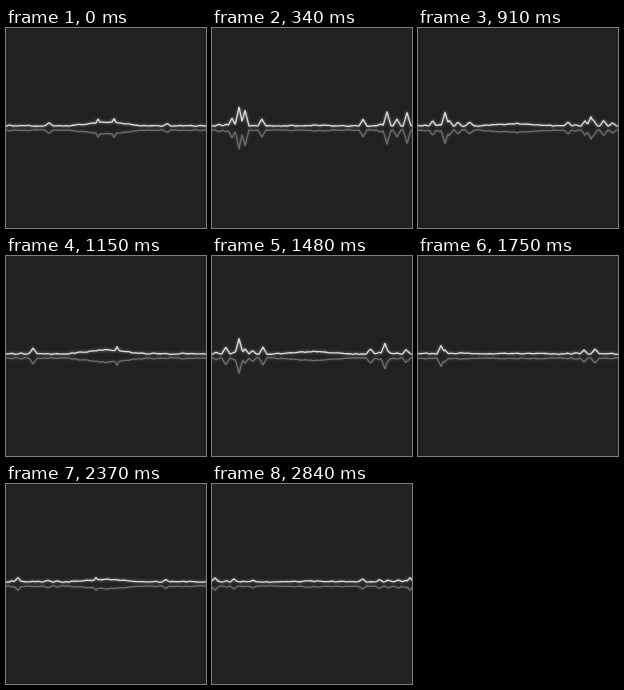
An HTML page with a canvas for the animation above (2890 ms loop, 200 by 200 pixels).

```html
<!DOCTYPE html>
<html lang="en">
<head>
<meta charset="utf-8">
<title>Sound wave</title>
<style>
  html, body { margin: 0; width: 100%; height: 100%; overflow: hidden; background: #212121; }
  canvas { display: block; width: 200px; height: 200px; }
</style>
</head>
<body>
<canvas id="wave" width="200" height="200"></canvas>
<script>
const LOOP = 2890, STEP = 50, MID = 100;
const ctx = document.getElementById('wave').getContext('2d');

// Key moments: hump is the bass in the middle, edge the treble at both sides,
// peaks the few [x, height] that stand out.
const keys = [
  { t: 0, hump: 4, edge: 1, peaks: [[43, 3], [92, 7], [108, 7], [161, 2]] },
  { t: 340, hump: .6, edge: 3, peaks: [[20, 8], [27, 19], [33, 16], [50, 7], [151, 7], [175, 14], [185, 7], [195, 13]] },
  { t: 680, hump: 1, edge: 2, peaks: [[17, 4.5], [32, 3], [73, 4], [80, 4], [87, 4], [122, 2.5], [170, 4]] },
  { t: 1150, hump: 4.4, edge: .8, peaks: [[27, 6], [111, 7]] },
  { t: 1750, hump: .4, edge: 1.2, peaks: [[23, 8], [27, 4], [166, 4], [177, 5]] },
  { t: 2370, hump: 2.6, edge: 1, peaks: [[12, 4], [42, 2], [90, 4], [160, 2.5]] },
  { t: 2840, hump: .8, edge: 3.2, peaks: [[3, 4], [22, 3], [198, 4]] }
];

// Loud hits between them: time and height.
const hits = [[830, 27], [1470, 23], [2030, 35], [2600, 18]];

const mix = (a, b, u) => a + (b - a) * u;
const ease = u => u * u * (3 - 2 * u);
const bump = (d, w) => Math.max(0, 1 - Math.abs(d) / w);
const rand = (a, b) => {
  const v = Math.sin(a * 127.1 + b * 311.7) * 43758.5453;
  return v - Math.floor(v);
};

function ripple(seed, x) {
  const u = x / 3, i = Math.floor(u);
  return mix(rand(seed, i), rand(seed, i + 1), u - i) * .9 - .4;
}

// Seeded spikes, nearly mirrored about the middle.
function spikes(level, seed) {
  return Array.from({ length: 12 }, (_, k) => {
    const x = 4 + 9 * (k >> 1) + 3 * rand(seed, k);
    return [k % 2 ? 2 * MID - x : x, level * rand(seed, k + 20)];
  });
}

// A hit rises quickly, dies away, and leads with one tall spike.
function hitPeaks(t, seed) {
  return hits.flatMap(([at, top]) => {
    const d = t - at;
    const level = top * (d < 0 ? bump(d, 60) : bump(d, 200) ** 2);
    return level ? [[27, level], [173, level * .7], ...spikes(level * .5, seed)] : [];
  });
}

const fade = (peaks, k) => peaks.map(([x, h]) => [x, h * k]);

function shape(t) {
  const i = keys.findLastIndex(k => k.t <= t);
  const a = keys[i], b = keys[(i + 1) % keys.length];
  const u = (t - a.t) / ((b.t || LOOP) - a.t), e = ease(u);
  const hump = mix(a.hump, b.hump, e);
  const peaks = [
    ...fade(a.peaks, (1 - u) ** 2), ...fade(b.peaks, u ** 2),
    ...spikes(mix(a.edge, b.edge, e), t), ...hitPeaks(t, t)
  ];
  return x => ripple(t, x) + peaks.reduce(
    (h, [px, ph]) => Math.max(h, ph * bump(x - px, 4)), hump * bump(x - MID, 40));
}

function line(h, side, color, glow) {
  ctx.beginPath();
  for (let x = -1; x <= 201; x++) ctx.lineTo(x, MID + side * (2 + h(x)));
  ctx.strokeStyle = color;
  ctx.shadowColor = glow;
  ctx.stroke();
}

function draw(t) {
  ctx.shadowBlur = 0;
  ctx.fillStyle = '#212121';
  ctx.fillRect(0, 0, 200, 200);
  ctx.lineWidth = 1.3;
  ctx.lineJoin = 'round';
  ctx.shadowBlur = 3;
  const h = shape(t);
  line(h, 1, '#6c6c6c', 'rgba(255,255,255,.2)');
  line(h, -1, '#dcdcdc', 'rgba(255,255,255,.55)');
}

// The picture changes about every STEP, in even parts of each key span.
function snap(t) {
  const i = keys.findLastIndex(k => k.t <= t);
  const from = keys[i].t, span = (keys[i + 1]?.t ?? LOOP) - from;
  const size = span / Math.round(span / STEP);
  return Math.round(from + Math.floor((t - from) / size) * size);
}

let shown = -1;
const origin = performance.now();
function tick() {
  const t = snap((performance.now() - origin) % LOOP);
  if (t !== shown) draw(shown = t);
  requestAnimationFrame(tick);
}
tick();
</script>
</body>
</html>
```
